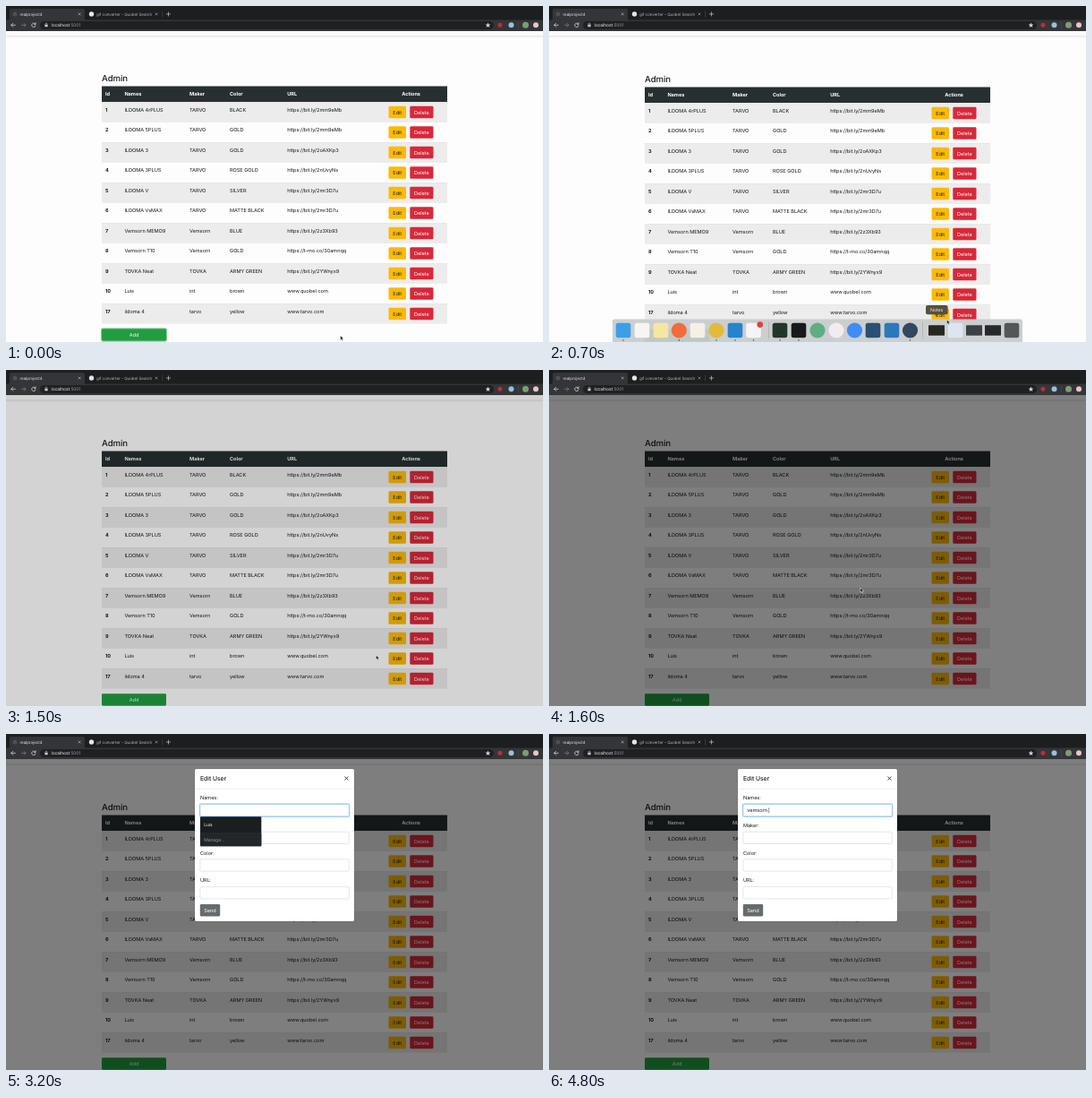
Animation of 600x375 px, one loop 5 s. Source, as an HTML page:

```html
<!DOCTYPE html>
<html lang="en">
<head>
<meta charset="utf-8">
<title>Admin table</title>
<style>
html, body { margin: 0; width: 100%; height: 100%; overflow: hidden; background: #fdfdfd; }
svg { display: block; width: 100vw; height: 100vh; }
text { font-family: Inter, Roboto, sans-serif; font-size: 5.6px; letter-spacing: -.04px; fill: #16191c; text-rendering: geometricPrecision; white-space: pre; }
</style>
</head>
<body>
<svg id="stage" viewBox="0 0 600 375" xmlns="http://www.w3.org/2000/svg"></svg>
<script>
const LOOP = 5000, STEP = 100;

const rows = [
  ['1', 'ILDOMA 4rPLUS', 'TARVO', 'BLACK', 'https://bit.ly/2mm9eMb'],
  ['2', 'ILDOMA 5PLUS', 'TARVO', 'GOLD', 'https://bit.ly/2mm9eMb'],
  ['3', 'ILDOMA 3', 'TARVO', 'GOLD', 'https://bit.ly/2oAXKp3'],
  ['4', 'ILDOMA 3PLUS', 'TARVO', 'ROSE GOLD', 'https://bit.ly/2nUvyNs'],
  ['5', 'ILDOMA V', 'TARVO', 'SILVER', 'https://bit.ly/2mr3D7u'],
  ['6', 'ILDOMA VsMAX', 'TARVO', 'MATTE BLACK', 'https://bit.ly/2mr3D7u'],
  ['7', 'Vemsorn MEMO9', 'Vemsorn', 'BLUE', 'https://bit.ly/2z3Xb93'],
  ['8', 'Vemsorn T10', 'Vemsorn', 'GOLD', 'https://t-mo.co/30amnqq'],
  ['9', 'TOVKA Neat', 'TOVKA', 'ARMY GREEN', 'https://bit.ly/2YWnyx9'],
  ['10', 'Luis', 'int', 'brown', 'www.quobel.com'],
  ['17', 'ildoma 4', 'tarvo', 'yellow', 'www.tarvo.com']
];
const cols = [111, 132.4, 205, 250, 314.2];

// markup helpers
const rect = (x, y, w, h, fill, r = 0, more = '') =>
  `<rect x="${x}" y="${y}" width="${w}" height="${h}" rx="${r}" fill="${fill}" ${more}/>`;
const text = (x, y, s, more = '') => `<text x="${x}" y="${y}" ${more}>${s}</text>`;
const dot = (x, y, r, fill, more = '') => `<circle cx="${x}" cy="${y}" r="${r}" fill="${fill}" ${more}/>`;
const line = (d, color, w = .8) =>
  `<path d="${d}" fill="none" stroke="${color}" stroke-width="${w}" stroke-linecap="round" stroke-linejoin="round"/>`;
const css = s => `style="${s}"`;
const cross = (x, y, r, color, w) => line(`M${x - r} ${y - r}l${2 * r} ${2 * r}m0 ${-2 * r}l${-2 * r} ${2 * r}`, color, w);
const button = (x, y, w, label, fill, ink = '#fff') =>
  rect(x, y, w, 13.5, fill, 1.4) + text(x + w / 2, y + 8.8, label, `text-anchor="middle" ${css('fill:' + ink)}`);

function browser() {
  const small = 'font-size:4.5px;fill:';
  let s = rect(0, 0, 600, 28, '#1d1e20') + rect(0, 15.5, 600, 12.5, '#343538');
  s += '<path d="M2 16q2 0 2-2V5q0-2 2-2H86q2 0 2 2v9q0 2 2 2z" fill="#343538"/>';
  s += dot(10, 9, 2.5, '#4d5054') + text(15.5, 10.6, 'realproject4', css(small + '#e4e5e7'));
  s += cross(82.2, 9, 1.1, '#c4c6c9', .6);
  s += dot(95.5, 9, 2.7, '#e4e6e8') + text(101, 10.6, 'gif converter - Quobel Search', css(small + '#b4b7bb'));
  s += cross(168, 9, 1.1, '#a4a7ab', .6) + line('M174.7 6v6', '#55575b', .5);
  s += line('M179.4 9h4.2M181.5 6.9v4.2', '#c4c6c9', .7);
  s += line('M10.4 21.3h-4.6m2-2l-2 2l2 2', '#d8dadd', .75);
  s += line('M17.4 21.3h4.6m-2-2l2 2l-2 2', '#7d8084', .75);
  s += line('M32.5 19.8a2.2 2.2 0 1 0 .6 2M33.1 18.8v1.6h-1.6', '#d8dadd', .75);
  s += rect(38, 17, 507, 9, '#1f2022', 4.5);
  s += rect(43.4, 20.7, 3.2, 2.6, '#c9cbce', .3) + line('M44 20.7v-.7a1 1 0 0 1 2 0v.7', '#c9cbce', .55);
  s += text(50.5, 23, 'localhost<tspan fill="#999da2">:5001</tspan>', 'style="font-size:4.9px" fill="#eceef0"')
    .replace('font-size:4.9px', 'font-size:4.9px;fill:#eceef0')
    .replace('<tspan fill="#999da2">', '<tspan style="fill:#999da2">');
  s += '<path d="M538.5 18.5l.8 1.9 2 .2-1.5 1.3.5 2-1.8-1.1-1.8 1.1.5-2-1.5-1.3 2-.2z" fill="#d0d2d5"/>';
  s += dot(552, 21.3, 2.5, '#c02c35') + dot(564.5, 21.3, 3, '#8ec6dc');
  s += line('M572.3 18v7', '#5a5c60', .5);
  return s + dot(580.5, 21.3, 3.5, '#7e9c73') + dot(592, 21.3, 3, '#e9c6c4');
}

function table() {
  let s = text(107, 85.4, 'Admin', css('font-size:9.6px;font-weight:500;letter-spacing:-.1px'));
  s += rect(107, 90.5, 386, 17.6, '#272f31');
  const head = css('font-weight:700;fill:#fff');
  ['Id', 'Names', 'Maker', 'Color', 'URL'].forEach((h, i) => s += text(cols[i], 101.3, h, head));
  s += text(452.6, 101.3, 'Actions', 'text-anchor="middle" ' + head);
  rows.forEach((row, i) => {
    const y = 108.1 + i * 22.5;
    s += rect(107, y, 386, 22.5, i % 2 ? '#fdfdfd' : '#ececec') + rect(107, y, 386, .4, '#d9dcdf');
    row.forEach((cell, c) => s += text(cols[c], y + 10.8, cell, c ? '' : css('font-weight:700')));
    s += button(427.5, y + 4.7, 19.5, 'Edit', '#fdba05', '#212529');
    s += button(451.3, y + 4.7, 26.2, 'Delete', '#d82839');
  });
  s += rect(106.5, 360.7, 73, 14.5, 'none', 1.8, 'id="ring" stroke="#219d40" stroke-opacity=".5" stroke-width="1.1"');
  return s + button(107, 361.2, 72, 'Add', '#219d40', '#f2fbf4');
}

function dock() {
  const icons = [
    [83, '#3a9fe8'], [104, '#f7f5f4'], [125, '#f5e6a2'], [145.3, '#f26b3a', 1], [166, '#f4f0e6'],
    [187, '#e4b93c', 1], [208, '#2584cf'], [228.5, '#f6f4f5'], [258, '#22372b'], [279, '#18191b'],
    [300, '#5fae83', 1], [321, '#f4eaf2', 1], [341.5, '#3f8cf3', 1], [362, '#294f73'], [383, '#2a79bd'],
    [403.5, '#33485f', 1], [454, '#dce6f2'], [517, '#53575a']
  ];
  let s = rect(71, 349.5, 458, 30, '#c9cccd', 2.5, 'fill-opacity=".94"');
  icons.forEach(([x, c, round]) => {
    s += round ? dot(x, 362, 8.6, c) : rect(x - 8.3, 353.7, 16.6, 16.6, c, 2.5);
  });
  s += dot(235.8, 355.6, 3.4, '#e5403a');
  [[433, '#29261f'], [475, '#3b4045'], [496, '#24292b']].forEach(([x, c]) => s += rect(x - 9, 356.3, 18, 11.4, c, .4));
  [245.5, 417.5].forEach(x => s += line(`M${x} 353v18`, '#a2a6a8', .6));
  [83, 145.3, 187, 208, 228.5, 258, 279, 403.5].forEach(x => s += dot(x, 373, .7, '#35383a'));
  return s;
}

function tip() {
  return rect(421, 334, 24.6, 10.2, '#57503c', 2) + '<path d="M431 344h4l-2 2.2z" fill="#57503c"/>' +
    text(433.2, 341, 'Notes', 'text-anchor="middle" ' + css('font-size:5.2px;fill:#efece4'));
}

function modal() {
  let s = rect(211, 39, 178, 170, '#fff', 1.6, 'stroke="#000" stroke-opacity=".2" stroke-width=".4"');
  s += text(217, 51.9, 'Edit User', css('font-size:6.8px;font-weight:500'));
  s += cross(380.4, 49.5, 1.7, '#3a3d40', 1) + rect(211, 60.9, 178, .45, '#dcdfe2');
  ['Names:', 'Maker:', 'Color:', 'URL:'].forEach((label, i) => {
    const y = 78.4 + i * 30.7;
    s += text(217, y - 5.1, label);
    s += rect(216.9, y, 166.4, 13.4, '#fff', 1.4, 'stroke="#c9ced3" stroke-width=".5"');
  });
  return s + button(216.8, 190, 22.4, 'Send', '#666c6e');
}

function field() {
  return rect(216.4, 77.9, 167.4, 14.4, 'none', 1.9, 'stroke="#007bff" stroke-opacity=".3" stroke-width="1.3"') +
    rect(216.9, 78.4, 166.4, 13.4, '#fff', 1.4, 'stroke="#80bdff" stroke-width=".6"') +
    text(221.2, 87.1, '', 'id="typed"') + rect(0, 82.2, .5, 6, '#222', 0, 'id="caret"');
}

function suggest() {
  return rect(217, 92.3, 68.3, 33, '#1b1e21', 1) + rect(217, 110.9, 68.3, 14.4, '#22262a', 1) +
    rect(217, 110.7, 68.3, .4, '#3a3e42') +
    text(221.2, 103.4, 'Luis', css('font-size:5px;fill:#f1f2f3')) +
    text(221.2, 120.2, 'Manage...', css('font-size:5px;fill:#90959a'));
}

const edge = 'stroke="#fff" stroke-width=".5" stroke-linejoin="round"';
const group = (id, body) => `<g id="${id}">${body}</g>`;
const stage = document.getElementById('stage');
stage.innerHTML =
  '<defs><linearGradient id="shade" x2="0" y2="1"><stop stop-color="#e6e6e6"/><stop offset="1" stop-color="#fdfdfd"/></linearGradient></defs>' +
  rect(0, 0, 600, 375, '#fdfdfd') + group('page', table()) +
  rect(0, 28, 600, 5, '#fbfbfb') + rect(0, 33, 600, 3, 'url(#shade)') +
  rect(0, 28, 600, 347, '#000', 0, 'id="veil"') +
  group('modal', modal() + group('field', field())) + group('suggest', suggest()) +
  browser() + group('dock', dock()) + group('tip', tip()) +
  group('arrow', `<path d="M0 0v5.2l1.2-1.1.9 1.9.9-.4-.9-1.9h1.6z" fill="#111" ${edge}/>`) +
  group('hand', `<path d="M-.5 0q.5-.6 1 0v2.2l2 .5q.6.2.5.9l-.5 2.6h-3l-1.8-2.4q.2-.8 1-.3l.8.5z" fill="#111" ${edge}/>`) +
  group('beam', line('M-.9 -2.6l.9.4l.9-.4M0 -2.2v4.4M-.9 2.6l.9-.4l.9.4', '#333', .5));

const el = {};
stage.querySelectorAll('[id]').forEach(e => el[e.id] = e);

// timeline
const clamp = v => Math.max(0, Math.min(1, v));
const part = (t, a, b) => clamp((t - a) / (b - a));
const easeOut = p => 1 - Math.pow(1 - p, 2.2);
const smooth = p => p * p * (3 - 2 * p);
const show = (e, on) => e.setAttribute('visibility', on ? 'visible' : 'hidden');
const move = (e, x, y) => e.setAttribute('transform', `translate(${x} ${y})`);

const path = [
  [0, 373.6, 367.8], [100, 373.6, 367.8], [250, 385, 373], [500, 426, 365], [700, 444.5, 350],
  [950, 441, 336], [1200, 436.5, 344.5], [1450, 436.5, 344.5], [1600, 347.8, 243],
  [1900, 252, 108], [2100, 220.6, 64.3], [2250, 222, 67], [2500, 238, 85]
];
const word = 'vemsorn ';
const keys = [3300, 3400, 3700, 4000, 4100, 4200, 4300, 4400];
const FOCUS = 2600;

function pointer(t) {
  const i = path.findIndex(p => p[0] > t);
  if (i < 0) return path[path.length - 1].slice(1);
  const a = path[i - 1], b = path[i], p = smooth(part(t, a[0], b[0]));
  return [a[1] + (b[1] - a[1]) * p, a[2] + (b[2] - a[2]) * p];
}

function draw(t) {
  move(el.page, 0, t < 200 ? -1 : 0);
  show(el.ring, t < 1350);

  const up = smooth(part(t, 250, 520)) - smooth(part(t, 880, 1150));
  move(el.dock, 0, 28 * (1 - up));
  show(el.dock, up > 0);
  show(el.tip, t >= 550 && t < 880);

  el.veil.setAttribute('opacity', .5 * part(t, 1450, 1600));
  move(el.modal, 0, -17.8 * (1 - easeOut(part(t, 1790, 2090))));
  el.modal.setAttribute('opacity', part(t, 1790, 1940));

  const count = keys.filter(k => k <= t).length;
  const lastKey = count ? keys[count - 1] : FOCUS;
  const focused = t >= FOCUS;
  show(el.field, focused);
  show(el.suggest, t >= 2800 && t < keys[0]);
  el.typed.textContent = word.slice(0, count);
  el.caret.setAttribute('x', 221.3 + (count ? el.typed.getComputedTextLength() : 0));
  show(el.caret, focused && (t - lastKey) % 1000 < 500);

  const [x, y] = pointer(t);
  const beam = t >= 2400, hand = t >= 1100 && t <= 1450;
  [el.arrow, el.hand, el.beam].forEach(e => move(e, x, y));
  show(el.arrow, !beam && !hand);
  show(el.hand, hand);
  show(el.beam, beam && t < 2800);
}

function tick() {
  const t = performance.now() % LOOP;
  draw(Math.floor(t / STEP) * STEP);
  requestAnimationFrame(tick);
}
tick();
</script>
</body>
</html>
```
